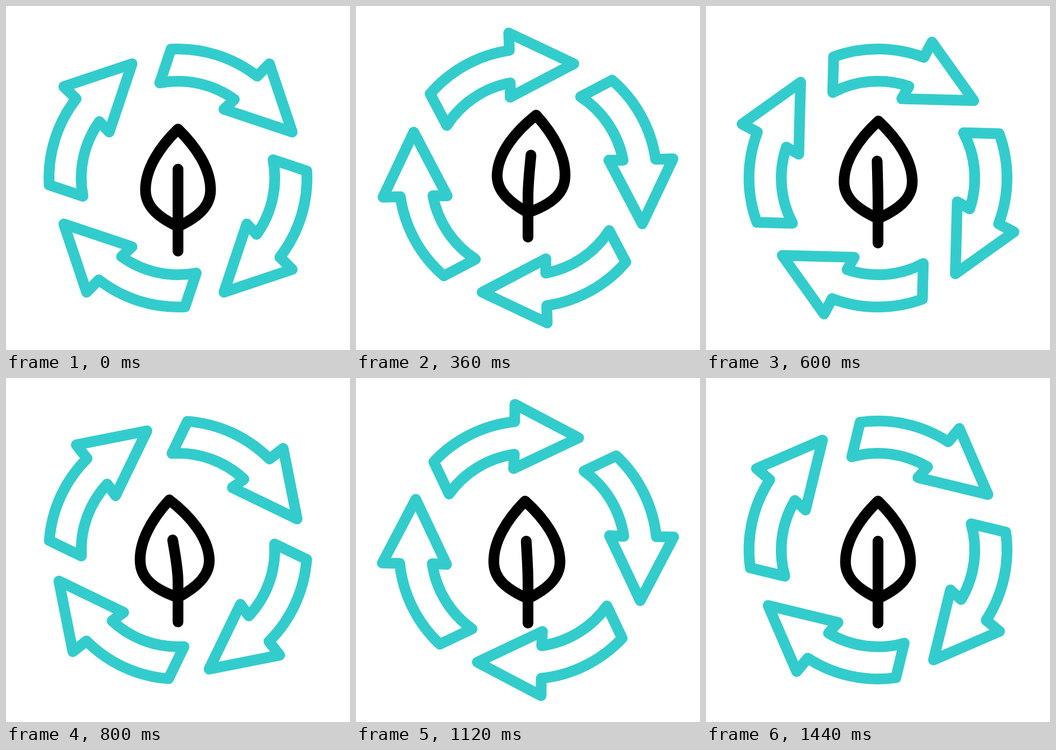
Animation of 640x640 px, one loop 1480 ms. Source, as an HTML page with a canvas:

```html
<!DOCTYPE html>
<html lang="en">
<head>
<meta charset="utf-8">
<title>Recycling leaf</title>
<style>
html, body { margin: 0; width: 100%; height: 100%; overflow: hidden; background: #fff; }
canvas { display: block; width: 100vmin; height: 100vmin; }
</style>
</head>
<body>
<canvas id="stage" width="640" height="640"></canvas>
<script>
const ctx = document.getElementById('stage').getContext('2d');
const LOOP = 1480, STEP = 40, CENTER = 320;
const OUTER = 240, INNER = 180;
const LEAF_BASE = 410.5;

// The plant hops up leaning right, lands leaning left, then straightens.
const upright = { tilt: 0, spread: 1, sway: 0, lift: 0 };
const keys = [
  { time: 90, ...upright },
  { time: 360, tilt: 0.083, spread: 1.04, sway: 5.5, lift: 26 },
  { time: 895, tilt: -0.104, spread: 1.06, sway: -11.3, lift: 0 },
  { time: 1245, ...upright }
];

const mix = (a, b, p) => a + (b - a) * p;
const ease = u => u * u * (3 - 2 * u);
const clamp = u => Math.min(1, Math.max(0, u));

function poseAt(time) {
  let i = 0;
  while (i < keys.length - 2 && time >= keys[i + 1].time) i++;
  const a = keys[i], b = keys[i + 1];
  const p = ease(clamp((time - a.time) / (b.time - a.time)));
  const pose = {};
  for (const name in upright) pose[name] = mix(a[name], b[name], p);
  return pose;
}

function arrowPath() {
  const angle = (x, y) => Math.atan2(y - CENTER, x - CENTER);
  const path = new Path2D();
  path.arc(CENTER, CENTER, OUTER, angle(307, 80), angle(467, 131));
  path.lineTo(490, 107.5);
  path.lineTo(532.5, 234.5);
  path.lineTo(405.5, 192);
  path.arc(CENTER, CENTER, INNER, angle(425.5, 173), angle(286, 143), true);
  path.closePath();
  return path;
}

// Half a leaf, standing on the origin and bulging to the left.
function leafSide() {
  const path = new Path2D();
  path.moveTo(0, -181.5);
  path.bezierCurveTo(-35, -147.5, -60.5, -107.5, -60.5, -68.5);
  path.bezierCurveTo(-60.5, -36.5, -35, -16.5, 0, 0);
  return path;
}

const arrow = arrowPath();
const side = leafSide();

function drawArrows(turn) {
  ctx.strokeStyle = '#33cccc';
  for (let i = 0; i < 4; i++) {
    ctx.save();
    ctx.translate(CENTER, CENTER);
    ctx.rotate(turn + i * Math.PI / 2);
    ctx.translate(-CENTER, -CENTER);
    ctx.stroke(arrow);
    ctx.restore();
  }
}

function drawPlant({ tilt, spread, sway, lift }) {
  ctx.save();
  ctx.translate(0, -lift);
  ctx.strokeStyle = '#000';

  // Bend the outline only, so the stroke keeps its weight.
  const plant = new Path2D();
  for (const flip of [1, -1]) {
    const width = flip * spread;
    plant.addPath(side, new DOMMatrix([width, flip * tilt, -tilt, 1, CENTER, LEAF_BASE]));
  }
  plant.moveTo(CENTER + sway, 303.5);
  plant.bezierCurveTo(CENTER + sway * 0.65, 325, CENTER, 355, CENTER, 382);
  plant.lineTo(CENTER, 456);
  ctx.stroke(plant);
  ctx.restore();
}

function draw(time) {
  ctx.fillStyle = '#fff';
  ctx.fillRect(0, 0, 640, 640);
  ctx.lineWidth = 20;
  ctx.lineJoin = ctx.lineCap = 'round';
  drawArrows(Math.PI * time / LOOP);
  drawPlant(poseAt(time));
}

const start = performance.now();
function tick() {
  // A small allowance keeps clock jitter from delaying a step.
  const elapsed = performance.now() - start + 2;
  draw(Math.floor((elapsed % LOOP) / STEP) * STEP);
  requestAnimationFrame(tick);
}
tick();
</script>
</body>
</html>
```
